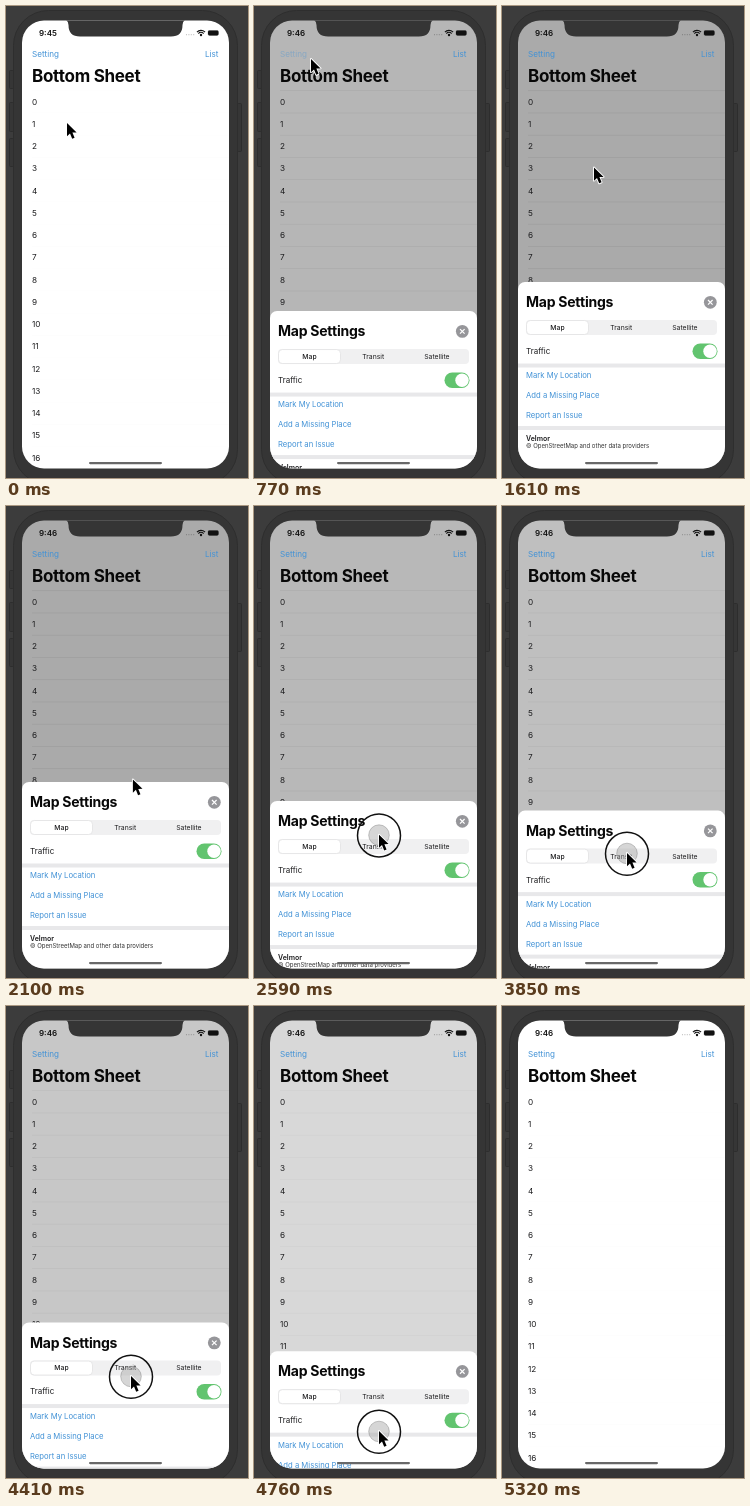
Write an HTML page with a canvas that moves like this. It is 242x472 px and loops after 5600 ms.

```html
<!DOCTYPE html>
<html lang="en">
<head>
<meta charset="utf-8">
<title>Bottom Sheet</title>
<style>
  html, body { margin: 0; width: 100%; height: 100%; overflow: hidden; background: #3b3b3b; }
  canvas { display: block; width: 242px; height: 472px; }
</style>
</head>
<body>
<canvas id="stage"></canvas>
<script>
const W = 242, H = 472, LOOP = 5600, STEP = 70;
const OPEN_TOP = 276, TRAVEL = H - OPEN_TOP;
const TAP = 490, OPEN = 560, GRAB = 2310, RELEASE = 2870, REGRAB = 3430, DISMISS = 4830;
const GRAB_Y = 292, RESISTANCE = 0.52;
const BLUE = '#4292d6', INK = '#1c1c1e', BEZEL = '#353535';

const canvas = document.getElementById('stage');
const ctx = canvas.getContext('2d');
const dpr = window.devicePixelRatio || 1;
canvas.width = W * dpr;
canvas.height = H * dpr;

// Smooth 0..1 progress between two times.
function ramp(t, from, to) {
  const u = Math.min(1, Math.max(0, (t - from) / (to - from)));
  return u * u * (3 - 2 * u);
}

// A short pull down and back, starting at GRAB.
function tug(t) {
  const u = (t - GRAB) / 890;
  return u > 0 && u < 1 ? 48 * Math.sin(Math.PI * u) ** 1.5 : 0;
}

function cursorAt(t) {
  const toTap = ramp(t, 0, TAP), toSheet = ramp(t, 1190, 2030);
  const x = 61 - 4 * toTap + 70 * toSheet - 2 * ramp(t, 2030, 2500);
  const y = 117 - 64 * toTap + 217 * toSheet + 22 * ramp(t, 2030, GRAB) + tug(t)
    + 55 * ramp(t, REGRAB, 3850) + 23 * ramp(t, 3850, 4410) + 110 * ramp(t, 4410, 5110);
  return { x, y };
}

function pullAt(t) {
  return RESISTANCE * (cursorAt(t).y - GRAB_Y);
}

function sheetTop(t) {
  if (t <= OPEN) return H;
  if (t < GRAB) return OPEN_TOP + TRAVEL * Math.exp((OPEN - t) / 110);
  if (t < RELEASE) return OPEN_TOP + pullAt(t);
  if (t < REGRAB) return OPEN_TOP + pullAt(RELEASE) * Math.exp((RELEASE - t) / 70);
  const pull = pullAt(Math.min(t, DISMISS));
  return OPEN_TOP + pull + (TRAVEL - pull) * ramp(t, DISMISS, 5110);
}

function isPressed(t) {
  const within = (from, to) => t >= from && t < to;
  return within(TAP, 630) || within(GRAB, RELEASE) || within(REGRAB, DISMISS);
}

function box(x, y, w, h, r, fill, stroke) {
  ctx.beginPath();
  ctx.roundRect(x, y, w, h, r);
  if (fill) { ctx.fillStyle = fill; ctx.fill(); }
  if (stroke) { ctx.strokeStyle = stroke; ctx.lineWidth = 1; ctx.stroke(); }
}

function disc(x, y, r, fill, stroke, width = 1) {
  ctx.beginPath();
  ctx.arc(x, y, r, 0, Math.PI * 2);
  if (fill) { ctx.fillStyle = fill; ctx.fill(); }
  if (stroke) { ctx.strokeStyle = stroke; ctx.lineWidth = width; ctx.stroke(); }
}

function label(text, x, y, size, { weight = 400, color = INK, align = 'left', tracking = 0 } = {}) {
  ctx.font = `${weight} ${size}px Inter, "Liberation Sans", sans-serif`;
  ctx.letterSpacing = tracking + 'px';
  ctx.textAlign = align;
  ctx.textBaseline = 'alphabetic';
  ctx.fillStyle = color;
  ctx.fillText(text, x, y);
}

function drawPhone() {
  ctx.fillStyle = '#3c3c3c';
  ctx.fillRect(0, 0, W, H);
  for (const [x, y, h] of [[3.5, 64.5, 18], [3.5, 96.5, 29], [3.5, 132.5, 28], [231.5, 97.5, 48]]) {
    box(x, y, 4, h, 1, '#363636', '#2d2d2d');
  }
  box(7.5, 4.5, 224, 474, 35, BEZEL, '#2e2e2e');
}

function drawNotch() {
  ctx.beginPath();
  ctx.moveTo(58, 13);
  ctx.quadraticCurveTo(62.5, 14.5, 62.5, 19);
  ctx.quadraticCurveTo(62.5, 30.5, 74, 30.5);
  ctx.lineTo(165, 30.5);
  ctx.quadraticCurveTo(176.5, 30.5, 176.5, 19);
  ctx.quadraticCurveTo(176.5, 14.5, 181, 13);
  ctx.closePath();
  ctx.fillStyle = BEZEL;
  ctx.fill();
}

function drawStatus(t) {
  label(t < 210 ? '9:45' : '9:46', 33, 29.8, 8, { weight: 600, color: '#111' });
  for (let i = 0; i < 4; i++) disc(180.5 + i * 2.4, 28.7, 0.6, 'rgba(0,0,0,.25)');
  ctx.strokeStyle = '#111';
  ctx.lineWidth = 1.1;
  for (const r of [5.6, 3.6]) {
    ctx.beginPath();
    ctx.arc(195, 30, r, -Math.PI * 0.76, -Math.PI * 0.24);
    ctx.stroke();
  }
  disc(195, 29, 1.2, '#111');
  box(202, 24.5, 10.5, 5, 1.4, '#111', 'rgba(0,0,0,.2)');
}

function drawList(t, dim) {
  const shade = Math.round(255 * (1 - dim));
  ctx.fillStyle = `rgb(${shade},${shade},${shade})`;
  ctx.fillRect(15, 13, 210, 452);
  ctx.globalAlpha = t >= TAP && t < 910 ? 0.4 : 1;
  label('Setting', 26, 50.5, 8.1, { color: BLUE });
  ctx.globalAlpha = 1;
  label('List', 212.5, 50.5, 8.1, { color: BLUE, align: 'right' });
  label('Bottom Sheet', 26, 76.4, 17, { weight: 700, color: '#080808', tracking: -0.3 });
  for (let i = -1; i <= 16; i++) {
    const y = 95.7 + i * 22.25;
    if (i >= 0) label(String(i), 26, y + 3, 8.2);
    ctx.fillStyle = `rgba(0,0,0,${0.01 + dim * 0.2})`;
    ctx.fillRect(26, y + 10.9, 197, 0.7);
  }
}

function drawSheet(top) {
  ctx.save();
  ctx.translate(0, top);
  box(16, 0, 207, 220, [7, 7, 0, 0], '#fff');
  label('Map Settings', 24, 25.3, 14, { weight: 700, color: '#080808', tracking: -0.25 });

  disc(208.3, 20.3, 6.4, '#96969a');
  ctx.strokeStyle = '#fff';
  ctx.lineWidth = 1.2;
  ctx.beginPath();
  ctx.moveTo(206, 18); ctx.lineTo(210.6, 22.6);
  ctx.moveTo(210.6, 18); ctx.lineTo(206, 22.6);
  ctx.stroke();

  box(24, 38, 191, 15, 4, '#f0f0f1');
  box(24.5, 38.5, 62, 14, 3.8, '#fff', '#e6e6e7');
  ['Map', 'Transit', 'Satellite'].forEach((name, i) =>
    label(name, 55.5 + i * 63.7, 47.9, 6.8, { weight: i ? 400 : 500, align: 'center' }));

  label('Traffic', 24, 71.9, 8);
  box(190.5, 61.5, 25, 15.4, 7.7, '#62c46f');
  disc(208, 69.2, 6.7, '#fff');

  ctx.fillStyle = '#e8e8ea';
  ctx.fillRect(16, 81.5, 207, 4);
  ctx.fillRect(16, 144, 207, 4);
  ['Mark My Location', 'Add a Missing Place', 'Report an Issue'].forEach((name, i) => {
    label(name, 24, 96.4 + i * 20, 7.7, { color: BLUE });
  });
  label('Velmor', 24, 159, 7, { weight: 600 });
  label('© OpenStreetMap and other data providers', 24, 166.3, 6, { color: '#333' });
  ctx.restore();
}

function drawCursor({ x, y }, pressed) {
  if (pressed) {
    disc(x, y + 0.5, 10.3, 'rgba(165,165,165,.45)', 'rgba(120,120,120,.4)');
    disc(x, y + 0.8, 21.5, null, '#111', 1.5);
  }
  ctx.save();
  ctx.translate(x, y);
  ctx.beginPath();
  ctx.moveTo(0, 0);
  for (const [px, py] of [[0, 13.2], [3, 10.4], [5.2, 15.8], [7.6, 14.8], [5.4, 9.6], [9.6, 9.4]]) {
    ctx.lineTo(px, py);
  }
  ctx.closePath();
  ctx.lineJoin = 'round';
  ctx.strokeStyle = '#fff';
  ctx.lineWidth = 1.8;
  ctx.stroke();
  ctx.fillStyle = '#000';
  ctx.fill();
  ctx.restore();
}

function draw(t) {
  const top = sheetTop(t);
  const openness = (H - top) / TRAVEL;
  // The backdrop fades evenly on opening, faster while dragging.
  const dim = 0.335 * Math.max(0, openness) ** (t < GRAB ? 1 : 1.83);

  ctx.setTransform(dpr, 0, 0, dpr, 0, 0);
  drawPhone();
  ctx.save();
  ctx.beginPath();
  ctx.roundRect(16, 14.6, 207, 447.8, 22);
  ctx.clip();
  drawList(t, dim);
  drawStatus(t);
  drawNotch();
  if (top < H) drawSheet(top);
  box(83, 456, 73, 2.2, 1.1, '#686868');
  ctx.restore();
  drawCursor(cursorAt(t), isPressed(t));
}

const start = performance.now();
function tick() {
  const elapsed = (performance.now() - start) % LOOP;
  draw(Math.floor(elapsed / STEP) * STEP);
  requestAnimationFrame(tick);
}
tick();
</script>
</body>
</html>
```
